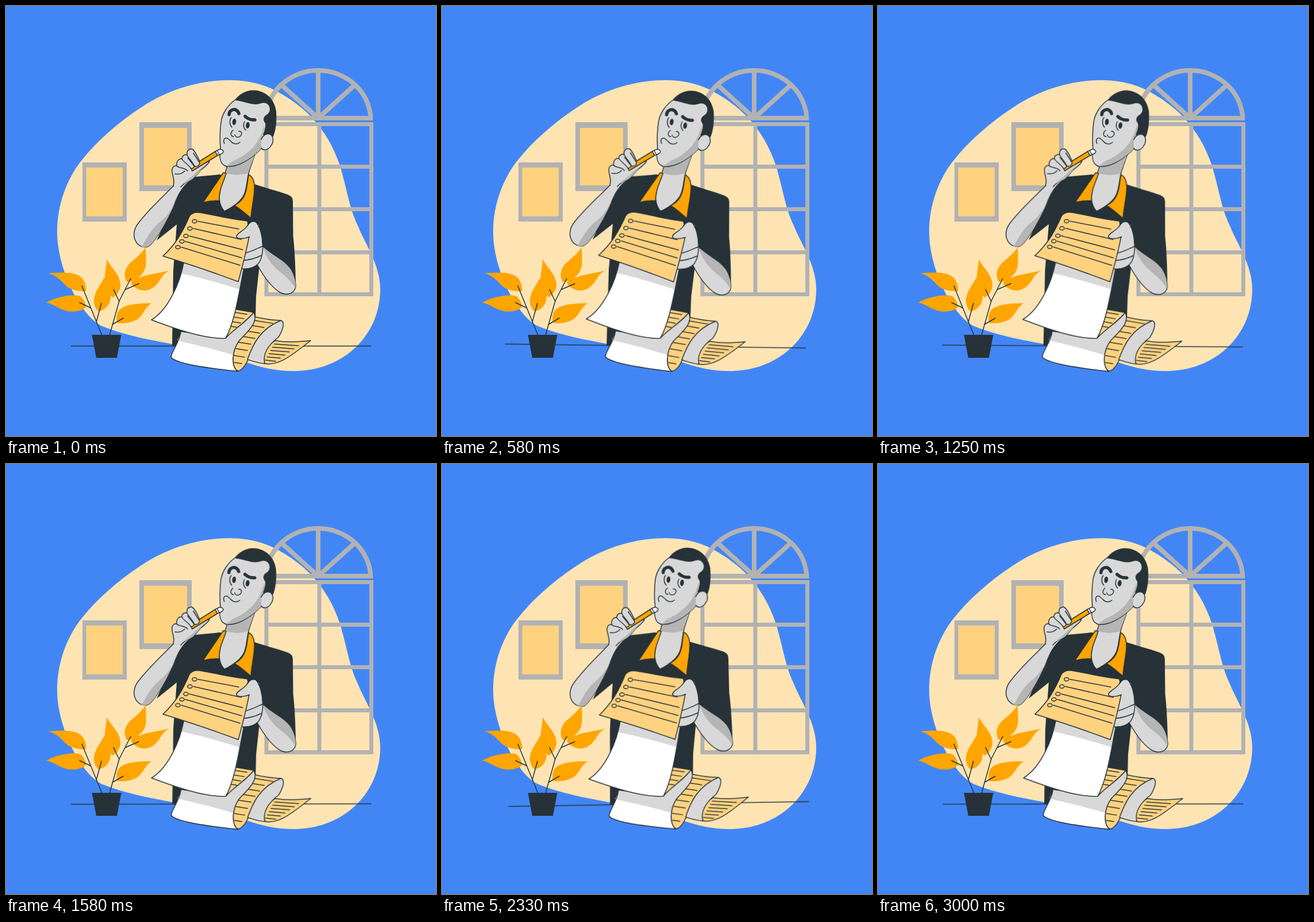
Write an HTML page that moves like this. It is 748 px wide and 748 px high and loops after 3040 ms.

```html
<!DOCTYPE html>
<html lang="en">
<head>
<meta charset="utf-8">
<title>Thinking over a list</title>
<style>
  html, body { margin: 0; width: 100%; height: 100%; overflow: hidden; background: #4286f6; }
  svg { display: block; width: 100vw; height: 100vh; }
  .dark { fill: #263238; }
  .gold { fill: #ffa500; }
  .sand { fill: #ffd280; }
  .skin { fill: #d8d8d8; }
  .shade { fill: #b5b5b5; }
  .grey { fill: #b2b2b2; }
  .white { fill: #fff; }
  .bar { fill: none; stroke: #b2b2b2; stroke-width: 8; }
  .ink { stroke: #263238; stroke-width: 1.5; stroke-linecap: round; stroke-linejoin: round; }
  .line { fill: none; }
  .brow { fill: none; stroke: #263238; stroke-width: 5.5; stroke-linecap: round; }
</style>
</head>
<body>
<svg viewBox="0 0 748 748">
  <path fill="#ffe4b3" d="M390 129C425 129 455 138 481 154C530 183 562 222 581 278C594 322 597 350 611 380C625 415 651 450 651 493C651 570 590 635 500 635C440 635 410 612 340 598C270 584 212 576 165 556C130 538 89 458 89 393C89 345 106 303 128 273C158 234 199 199 245 170C290 143 340 129 390 129Z"/>

  <!-- window -->
  <path class="bar" d="M451.500 199A91.500 87 0 0 1 634.500 199M450 195H638M543 112V195M543 195L480 138M543 195L606 138"/>
  <path class="bar" style="stroke-width:7" d="M453 205.500H635.500V501.500H453ZM545 205V501M453 279.500H635M453 353.500H635M453 428.500H635"/>

  <!-- wall pictures -->
  <path class="grey" d="M232 202H323V322H232ZM133 272H210V375H133Z"/>
  <path class="sand" d="M240 212H315V312H240ZM139.500 281H203V366H139.500Z"/>

  <g id="figure">
    <path class="ink line" d="M113 591.500H635"/>

    <!-- shirt -->
    <path class="dark" d="M372 293L330 297C315 299 307 304 301 313L290 345L262 408L297 380L291 460L289 591H380L434 545L435 505L441 450L446 425L500 470L504 484Q503 430 499.500 400L499 340Q499 331 490 328C470 321 450 316 432 310L400 300Z"/>

    <!-- neck and collar -->
    <path class="skin ink" d="M386 274C380 298 371 315 371 335C372 345 376 353 380 357C390 352 409 342 415 326C420 312 419 298 424 284L434 255Z"/>
    <path class="shade" d="M386 277L383 291C400 296 412 293 421 291L433 258L400 278Z"/>
    <path class="gold ink" d="M378 290L342.500 342Q357 338 371 339C370 319 379 306 383 291Z"/>
    <path class="gold ink" d="M422 293C431 298 433 309 432 321C431 338 427 352 426 369C417 362 407 352 397 347C411 341 417 328 419 314Z"/>

    <!-- head -->
    <path class="skin ink" d="M399 163C386 172 376 187 374 202C372 218 372 235 373 248C370 266 374 277 384 279C404 281 428 265 445 247L462 222V175L440 155Z"/>
    <path class="shade" d="M449 207C444 232 428 256 394 270L384 278C404 280 428 265 445 247L451 215Z"/>
    <path class="dark" d="M398 164C405 153 418 146.500 430 146.500C452 147 467 162 470 183C471 200 470 214 465 227L447 224C450 218 452 210 451 204C447 199 447 194 452 190C460 186 460 178 457 173C453 167 447 168 441 170C430 174 417 166 398 164Z"/>
    <path class="skin ink" d="M444 232C447 225 453 221 459 223C466 226 466 237 461 243C457 250 448 253 444 247"/>
    <path class="brow" d="M388 189C388 183 393 179.500 398 180C402 181 404 184 405 187M416 192C420 196 427 198.500 433 198"/>
    <ellipse class="dark" cx="397" cy="201.500" rx="3.300" ry="5.500" transform="rotate(8 397 201.500)"/>
    <ellipse class="dark" cx="420.500" cy="207.500" rx="3.300" ry="5.500" transform="rotate(8 420.500 207.500)"/>
    <path class="ink line" d="M392 194C388 199 389 207 393 211M415 201C412 207 413 212 417 216M395 216C390 220 390 227 396 227M398 224C399 230 409 230 410 221Q408 217 405 218M380 239C377 234 380 228 385 230L391 235C395 241 403 241 407 237"/>

    <!-- raised arm and pencil -->
    <path class="skin ink" d="M291 313C272 333 250 352 230 378C222 388 221 400 225 408C229 417 240 422 248 418C262 408 285 365 297 335C303 322 312 309 324 302Z"/>
    <path class="shade" d="M236 419C246 402 252 388 270 374C284 362 292 347 300 329L297 335C285 365 262 408 248 418Q242 421 236 419Z"/>
    <path class="skin ink" d="M291 313C294 303 290 297 289 289C288 281 292 277 297 278C296 270 301 265 306 266C306 260 311 258 315 259C314 252 318 248 324 249C329 252 332 260 335 266L339 274L354 270C354 274 345 280 338 286C333 293 328 298 323 302C315 305 308 310 304 315"/>
    <path class="shade" d="M351 272C344 280 334 285 329 291C322 299 314 303 308 310L323 302C329 297 333 293 338 286Z"/>
    <path class="gold ink" d="M321 280L364 253L368 260L324 287Z"/>
    <path class="white ink" d="M364 253L371 249.500C377 248 381 254 375 257L368 260ZM367 251L371 258"/>
    <path class="skin ink" d="M315 259C318 266 324 270 328 279Q336 280 337 273L326 256"/>
    <path class="skin ink" d="M306 266C310 273 317 275 322 283Q328 282 327 278L316 264"/>
    <path class="ink line" d="M297 278C301 283 310 280 316 287M294 292Q304 294 311 287"/>

    <!-- folded strip -->
    <path class="sand ink" d="M530 582C510 584 490 586 468 582C451 592 446 609 450 622C476 627 501 604 530 582Z"/>
    <path class="sand ink" d="M430 540Q454 546 478 547C455 561 438 573 429 594C422 615 415 632 404 635C393 632 393 609 399 592C405 577 431 562 432 544Z"/>
    <path class="skin ink" d="M478 547C486 549 482 563 474 576C457 589 446 605 450 622C440 622 430 618 420 615C429 590 441 562 478 547Z"/>
    <path class="sand ink" d="M396 527L431 533C420 547 399 561 382 578Z"/>
    <path class="white" d="M304 567C302 585 288 600 287 611C295 622 350 630 403 635.500C391 627 393 600 405 583C418 568 440 552 431 533C416 552 396 562 382 578Z"/>
    <path class="skin" d="M304 567C303 573 300 578 298 582C330 589 365 598 395 607C396 597 400 589 405 583C418 568 440 552 431 533C416 552 396 562 382 578Z"/>
    <path class="ink line" d="M304 567C302 585 288 600 287 611C295 622 350 630 403 635.500C391 627 393 600 405 583C418 568 440 552 431 533C416 552 396 562 382 578"/>
    <g id="rules" class="ink"></g>

    <!-- hanging sheet -->
    <path class="white" d="M309 447C303 480 283 528 253 546C290 560 345 580 382 578C398 550 405 500 414 455Z"/>
    <path class="skin" d="M309 447L304 465C340 473 375 483 407 493L414 455Z"/>
    <path class="ink line" d="M309 447C303 480 283 528 253 546C290 560 345 580 382 578C398 550 405 500 414 455"/>

    <!-- lowered arm -->
    <path class="skin ink" d="M446 417C460 432 481 440 493 455C501 465 506 485 503 492C498 502 487 503 478 499C462 490 448 470 437 450Z"/>
    <path class="shade" d="M446 418C460 432 481 440 493 455C501 465 506 485 503 491C488 462 462 464 446 418Z"/>
    <path class="skin ink" d="M418 382C428 371 437 374 440 383C444 394 446 402 446 411C448 426 445 440 439 448C431 457 418 458 408 457Z"/>
    <path class="ink line" d="M446 418C436 422 426 428 414 430M444 434C434 439 424 442 410 443"/>

    <!-- list -->
    <path class="sand ink" d="M273 435C295 415 308 392 319 366C323 360 330 358 338 359.500C365 364 390 371 420 374L424 395C419 425 411 453 404 479.500C360 463 315 448 273 435Z"/>
    <g id="items" class="ink line"></g>
    <path class="skin ink" d="M401 402C399 396 415 391 420 382C425 374 432 372 437 378C438 388 433 397 425 401C415 405 405 406 401 402Z"/>
    <path class="skin" d="M427 376L440 381L440 402L424 402Z"/>
    <path class="ink line" d="M420 382C425 374 432 372 437 378L440 385"/>
  </g>

  <!-- plant -->
  <g class="gold">
    <path d="M74 465C98 463 126 461 135 477C139 485 140 491 139 496C125 497 112 493 106 488C97 480 90 469 74 465Z"/>
    <path d="M70 516C85 507 115 500 130 505C136 511 139 518 139 524C130 532 115 533 104 530C90 526 82 518 70 516Z"/>
    <path d="M175 440C183 456 200 468 199 487C198 496 192 503 186 507C176 500 170 488 172 468C173 457 175 450 175 440Z"/>
    <path d="M171 472C166 484 152 498 153 515C154 523 157 528 161 531C172 529 181 521 182 507C183 495 175 485 171 472Z"/>
    <path d="M243 420C243 440 246 452 239 463C231 475 220 480 210 480C204 470 206 458 214 449C223 440 234 433 243 420Z"/>
    <path d="M284 460C262 466 244 467 234 472C225 474 219 478 217 482C224 492 234 495 242 495C255 494 262 485 267 478C272 470 276 464 284 460Z"/>
    <path d="M253 517C235 517 205 518 196 530C191 538 192 546 193 551C205 554 225 550 233 541C240 533 244 523 253 517Z"/>
  </g>
  <path class="ink line" d="M167 573L132 487M128 516L147 525M157 550L166 517M180 573L197 513L217 474M208 493L231 483M197 514L187 493M185 554L204 543"/>
  <path class="dark" d="M149.500 572H200.500L193 612H157Z"/>
</svg>
<script>
  const add = (id, tag, attrs) => {
    const el = document.createElementNS('http://www.w3.org/2000/svg', tag);
    for (const key in attrs) el.setAttribute(key, attrs[key]);
    document.getElementById(id).append(el);
  };
  const line = (id, x1, y1, x2, y2) => add(id, 'line', { x1, y1, x2, y2 });

  // List rows: bullet position, then the end of the written line
  for (const [x, y, x2, y2] of [
    [328, 374.5, 405, 388], [320, 387, 409, 406], [313, 400, 412, 424],
    [306, 409.5, 410, 438], [299, 419.5, 407, 451]
  ]) {
    add('items', 'ellipse', { cx: x, cy: y, rx: 4, ry: 3 });
    line('items', x + 6, y, x2, y2);
  }

  // Writing on the folds: start point and length
  for (const [x, y, w] of [
    [398, 533, 21], [396, 541, 18], [393, 549, 15], [390, 557, 11],
    [432, 547, 32], [429, 556, 20], [422, 566, 19], [413, 575, 20],
    [405, 585, 21], [400, 596, 20], [397, 608, 18], [397, 620, 13]
  ]) line('rules', x, y, x + w, y + w * 0.16);
  for (let i = 0; i < 6; i++) {
    line('rules', 467 - i * 3.2, 588 + i * 5.6, 509 - i * 8, 591 + i * 5.4);
  }

  const figure = document.getElementById('figure');
  figure.style.transformOrigin = '374px 391px';
  figure.animate([
    { offset: 0, transform: 'rotate(0deg)' },
    { offset: 0.25, transform: 'rotate(1deg)' },
    { offset: 0.75, transform: 'rotate(-1deg)' },
    { offset: 1, transform: 'rotate(0deg)' }
  ], { duration: 3040, iterations: Infinity });
</script>
</body>
</html>
```
